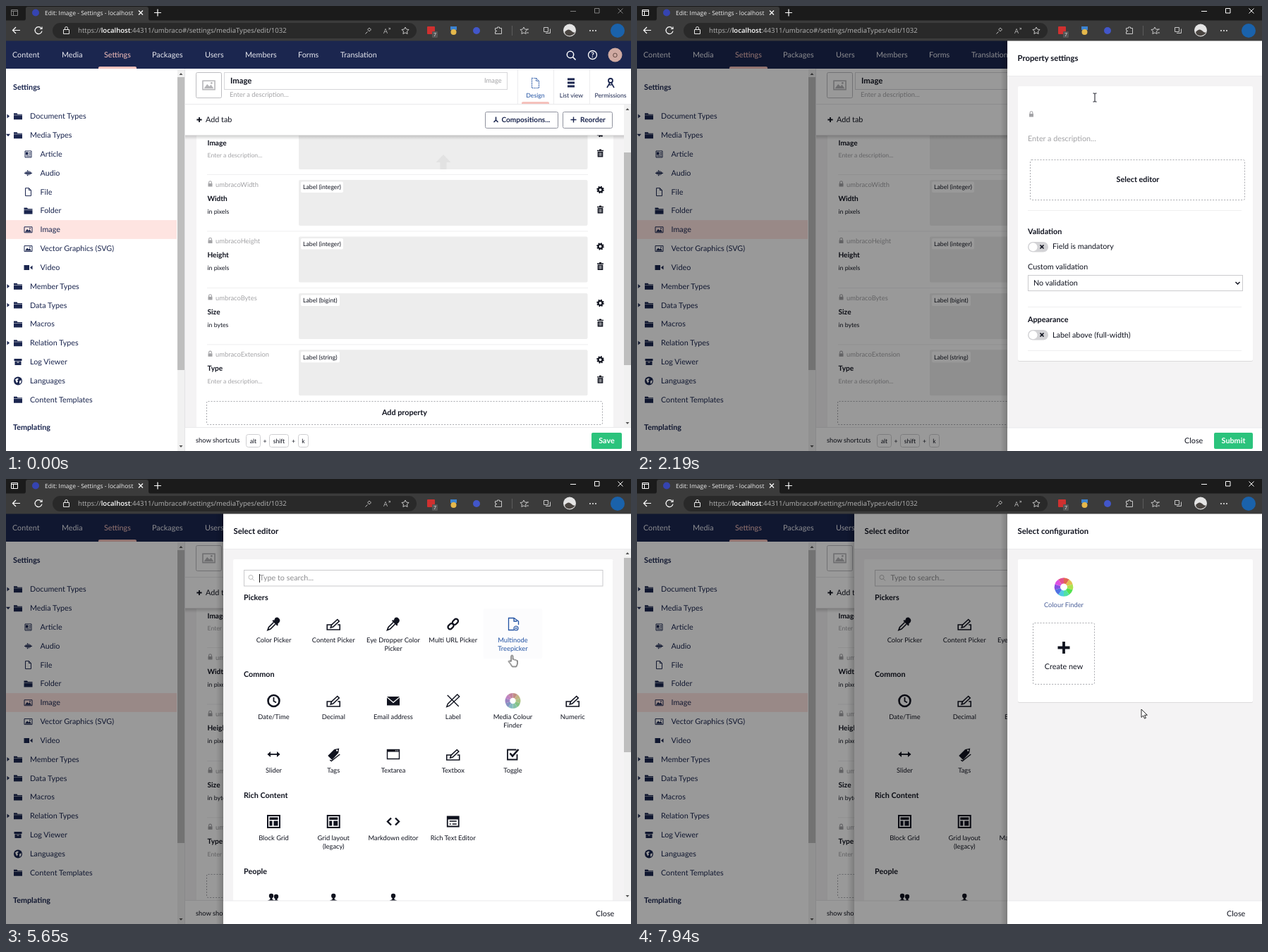
Recreate the animation shown at these times as an HTML page. Size 886 by 632 pixels, loop 8000 ms.

```html
<!DOCTYPE html>
<html lang="en">
<head>
<meta charset="utf-8">
<title>Media type editor</title>
<style>
html, body { margin: 0; width: 100%; height: 100%; overflow: hidden; background: #fff; }
svg { display: block; width: 886px; height: 632px; color: #10131f; }
text { font: 10.8px Lato, sans-serif; fill: currentColor; text-rendering: geometricPrecision; white-space: pre; }
.b { font-weight: 700; }
.h { font-size: 11.3px; font-weight: 700; }
.k { font-size: 10.1px; }
.m { font-size: 9.36px; }
.s { font-size: 8.7px; }
.c { text-anchor: middle; }
.g { fill: #a3a3a6; }
.w { fill: #fff; }
.ui { font-family: "Open Sans", sans-serif; font-size: 8.5px; fill: #f0f0f0; }
.url { font-family: "Open Sans", sans-serif; font-size: 9.58px; fill: #b4b4b4; }
.url tspan { font-weight: 600; fill: #fff; }
.tiny { font-size: 7px; }
.line { fill: none; stroke: currentColor; }
</style>
</head>
<body>
<svg id="stage" viewBox="0 0 886 632" xmlns="http://www.w3.org/2000/svg"></svg>
<script>
const LOOP = 8000, NAVY = '#1b264f', BLUE = '#2152a3', GREEN = '#2bc37c', PAGE = '#f4f3f4', BUTTON_EDGE = '#8f929e';

// Drawing helpers
const text = (x, y, str, cls = '', more = '') => `<text x="${x}" y="${y}" class="${cls}" ${more}>${str}</text>`;
const box = (x, y, w, h, fill, more = '') => `<rect x="${x}" y="${y}" width="${w}" height="${h}" fill="${fill}" ${more}/>`;
const frame = (x, y, w, h, stroke, more = '') => box(x + .5, y + .5, w - 1, h - 1, 'none', `stroke="${stroke}" ${more}`);
const dashed = (x, y, w, h) => frame(x, y, w, h, 'currentColor', 'stroke-opacity=".36" stroke-dasharray="2 2" rx="2"');
const line = (d, width = 1, more = '') => `<path class="line" d="${d}" stroke-width="${width}" ${more}/>`;
const fill = (d, more = '') => `<path d="${d}" fill="currentColor" ${more}/>`;
const dot = (x, y, r, color, more = '') => `<circle cx="${x}" cy="${y}" r="${r}" fill="${color}" ${more}/>`;
const ring = (r, width, more = '') => `<circle class="line" r="${r}" stroke-width="${width}" ${more}/>`;
const group = (id, body) => `<g id="${id}">${body}</g>`;
const tint = (color, body) => `<g color="${color}">${body}</g>`;
const at = (x, y, body, color) => `<g transform="translate(${x} ${y})"${color ? ` color="${color}"` : ''}>${body}</g>`;
const rule = (x1, x2, y, color = '#efeff0') => box(x1, y, x2 - x1, 1, color);

const wheel = (r, hole, sat, light) => {
  const n = 10;
  const point = i => {
    const a = i / n * 2 * Math.PI - Math.PI / 2;
    return `${(r * Math.cos(a)).toFixed(2)} ${(r * Math.sin(a)).toFixed(2)}`;
  };
  let out = '';
  for (let i = 0; i < n; i++)
    out += `<path d="M0 0L${point(i)}A${r} ${r} 0 0 1 ${point(i + 1)}Z" fill="hsl(${(10 + i * 36) % 360} ${sat}% ${light}%)"/>`;
  return out + dot(0, 0, hole, '#fff');
};

const person = dot(0, -3, 3.2, 'currentColor') + fill('M-1.5-1h3v3l4 2v4h-11v-4l4-2z');
const chainLink = x => `<rect class="line" x="${x}" y="-3" width="9" height="6" rx="3" stroke-width="2.3"/>`;
const icons = {
  folder: fill('M-6-4.5h4.5l1 1.5H6v1h-12zM-6-1.5H6v6h-12z'),
  article: line('M-4.5-4.5h9v9h-9zM1-2h2.5M1 0h2.5M-3 2.5h6.5') + fill('M-3.5-3h3.5v4h-3.5z'),
  audio: line('M-5.5 0h11M-3-2v4M-1-4v8M1-3v6M3-2v4', 1.3),
  file: line('M-4-5.5h5l3 3v8h-8zM1-5.5v3h3'),
  image: line('M-5.5-4h11v8h-11z') + fill('M-4.5 3l3-4 2 2.2L2-.5 4.5 3z') + dot(2.5, -2, .9, 'currentColor'),
  video: fill('M-6-3.5h7.5v7H-6zM2.5 0L6-3v6z'),
  box: fill('M-5.5-4.5h11v3h-11zM-4.5-1h9v5.5h-9z') + box(-1.5, 0, 3, 1, '#fff'),
  globe: dot(0, 0, 6, 'currentColor') + '<path d="M-4-2l3-2 2 1-2 2 1 2-2 2zM2 0l3-1-1 4-2 1z" fill="#fff"/>',
  lock: tint('#a3a3a6', fill('M-3-1h6v4.5h-6z') + line('M-1.9-1v-1.3a1.9 1.9 0 0 1 3.8 0V-1', 1.1)),
  gear: ring(3, 2.3) + ring(4.4, 1.8, 'stroke-dasharray="1.8 1.656"'),
  trash: fill('M-4.5-4.2h3v-1.3h3v1.3h3v1.4h-9zM-3.8-2h7.6v7.5h-7.6z') + '<path d="M-1.6-.8v5M0-.8v5M1.6-.8v5" stroke="#fff" stroke-width=".7"/>',
  dropper: fill('M2-8.5q3-2 5.5.5t.5 5.5L5.5 0l1 1L5 2.5l-7-7L-.5-6l1 1z') + line('M0-2.5l-7 7-1.5 4 4-1.5 7-7', 1.7),
  edit: line('M-2 1h-7v7H9V1H6', 1.6) + line('M-4 5l1-3.5L5.5-6.5 8-4-.5 4z', 1.6),
  link: `<g transform="rotate(-45)">${chainLink(-9)}${chainLink(0)}</g>`,
  docplus: line('M2 8.5h-8v-17h7.5L8-4V1M1.5-8.5V-4H6', 1.3) + ring(3, 1.2, 'cx="4.5" cy="6"') + line('M4.5 4.5v3M3 6h3'),
  clock: ring(8, 2.6) + line('M0-5V.5l3.5 2', 1.8),
  mail: fill('M-9-6H9L0 1.5zM-9-4.5L0 3.2 9-4.5v11H-9z'),
  label: line('M-8-8L8 8M-9 8.5L-7.5 4.5 6-9l3 3L-5 7z', 1.4),
  slider: line('M-8 0H8', 1.8) + fill('M-9 0l4.5-4v8zM9 0L4.5-4v8z'),
  tags: fill('M-8 2L1-7l7-1.5L7-2-2 8z') + line('M-5 8l2 1.5L9 0', 1.5) + dot(5, -5.5, 1.2, '#fff'),
  window: line('M-8.5-6.5h17v13h-17z', 1.4) + fill('M-9-7H9v3.5H-9z') + '<path d="M3-5.2h4.5" stroke="#fff" stroke-dasharray="1 .7"/>',
  check: line('M5-6.5H-7.5v14H6V0', 1.8) + line('M-4-1.5l3.5 4L8-7', 2.6),
  grid: line('M-8.5-8.5h17v17h-17z', 2) + fill('M-6-6H6v3.5H-6zM-6-1h4v7h-4zM0-1h6v7H0z'),
  code: line('M-3-5l-5 5 5 5M3-5l5 5-5 5', 2.4),
  rich: line('M-8-7H8V7H-8z', 1.8) + fill('M-8-7H8v4H-8z') + line('M-5-.5H5M-5 3.5h2M-1 3.5h6', 1.7),
  person,
  people: at(3.5, 1, person) + at(-3.5, 0, person),
  wheel: wheel(11, 4.2, 34, 64)
};
const icon = (name, x, y, color) => at(x, y, icons[name], color);
const plus = (x, y, r, w) => line(`M${x - r} ${y}h${2 * r}M${x} ${y - r}v${2 * r}`, w);

const scrollbar = (x, top, bottom, thumbTop, thumbBottom) =>
  box(x, top, 10, bottom - top, '#f1f1f1') + box(x, thumbTop, 10, thumbBottom - thumbTop, '#bebebe') +
  `<path d="M${x + 2.5} ${top + 8}l2.5-3 2.5 3zM${x + 2.5} ${bottom - 8}l2.5 3 2.5-3z" fill="#555"/>`;

const button = (x, w, label) => box(x, 606, w, 23, GREEN, 'rx="2"') + text(x + w / 2, 620.5, label, 'b c w');

function browser() {
  const windowButtons = line('M800 7.5h8M834.5 3.5h6.5v6.5h-6.5zM867.5 3.5l7 7M874.5 3.5l-7 7M7.5 5.5h9v8h-9zM7.5 7.5h9M10.5 7.5v6', 1, 'color="#fff"');
  const tools = line('M20 34.5H9.5M14 30l-4.5 4.5L14 39M50 31.5a5 5 0 1 0 1 4M51 29.5v3h-3M188 6.5l6 6M194 6.5l-6 6M210 9.5h10M215 4.5v10', 1.2, 'color="#fff"');
  const lock = line('M81.5 33.5h8v6h-8zM83.5 33.5v-2a2 2 0 0 1 4 0v2', 1, 'color="#e8e8e8"');
  const star = 'l1.5 3 3.5.5-2.5 2.5.6 3.5-3.1-1.6-3.1 1.6.6-3.5-2.5-2.5 3.5-.5z';
  const actions = line(`M566 30${star}M734 30${star}M738 33h3M738 38h3M512.5 36.5l-3 3M515 31.5a2 2 0 1 0 .1 0M762.5 30.5h6v6h-6zM765 38.5h6.5v-6M693.5 31.5h3v-1.5h3v1.5h3v8h-9v-3h1.5v-2h-1.5z`, 1, 'color="#c8c8c8"');
  return box(0, 0, 886, 22, '#1b1b1b') + box(0, 20.5, 886, 29, '#3b3b3b') +
    '<path d="M25 21q3 0 3-4V4q0-3 3-3h168q3 0 3 3v13q0 4 3 4z" fill="#3b3b3b"/>' +
    group('chrome', windowButtons) + dot(42, 9.5, 5, '#3544b1') +
    text(55, 12.5, 'Edit: Image - Settings - localhost', 'ui') +
    box(66, 24, 516, 22, '#292929', 'rx="11"') + tools + lock +
    text(102, 38, 'https://<tspan>localhost</tspan>:44311/umbraco#/settings/mediaTypes/edit/1032', 'url') +
    actions + text(535, 38.5, 'A', 'url') + text(542, 34, '»', 'ui tiny') +
    box(597, 29, 11, 11, '#d0302f', 'rx="1"') + box(604, 36, 8, 9, '#555', 'rx="1"') + text(606, 43, '7', 'ui tiny') +
    box(630, 29, 9, 5, '#3b82d0') + dot(634.5, 37, 4, '#e5b84b') + dot(667, 35, 5, '#4256c9') +
    box(717, 28, 1, 14, '#5b5b5b') + dot(799, 34.5, 9, '#e4e4e4') + '<path d="M792 37q5-6 9-2t6 2a9 9 0 0 1-14 3z" fill="#4a4541"/>' +
    [828, 832, 836].map(x => dot(x, 35, 1, '#eee')).join('') + dot(867, 35, 10, '#1a62ab');
}

function navigation() {
  const items = [['Content', 9], ['Media', 79], ['Settings', 139], ['Packages', 207], ['Users', 282], ['Members', 339], ['Forms', 414], ['Translation', 474]];
  return box(0, 49, 886, 40, NAVY) +
    items.map(([name, x]) => text(x, 72.7, name, '', `style="fill:${name === 'Settings' ? '#f5c1bc' : '#e6e7ee'}"`)).join('') +
    '<path d="M131 89v-1.5q0-1.5 2-1.5h50q2 0 2 1.5V89z" fill="#f5c1bc"/>' +
    at(800, 69, ring(4.7, 1.5) + line('M3.5 3.5l4 4', 1.7), '#fff') +
    at(831.5, 69.5, ring(6, 1.3) + text(0, 3.5, '?', 'b k c'), '#fff') +
    dot(863.5, 69.5, 10, '#d0aaa2') + text(863.5, 72.7, 'O', 's c', 'style="fill:#4d3630"');
}

function sidebar() {
  const rows = [
    ['Document Types', 'folder', 0, 'closed'], ['Media Types', 'folder', 0, 'open'], ['Article', 'article', 1], ['Audio', 'audio', 1],
    ['File', 'file', 1], ['Folder', 'folder', 1], ['Image', 'image', 1], ['Vector Graphics (SVG)', 'image', 1], ['Video', 'video', 1],
    ['Member Types', 'folder', 0, 'closed'], ['Data Types', 'folder', 0, 'closed'], ['Macros', 'folder', 0],
    ['Relation Types', 'folder', 0, 'closed'], ['Log Viewer', 'box', 0], ['Languages', 'globe', 0], ['Content Templates', 'folder', 0]
  ];
  const arrows = { closed: 'M1.5-3l3.5 3-3.5 3z', open: 'M0-1.5h6l-3 3.5z' };
  const body = rows.map(([name, glyph, level, arrow], i) => {
    const y = 156.5 + i * 26.83;
    return (name === 'Image' ? box(0, y - 13.4, 242, 26.8, '#fee4e1') : '') +
      (arrow ? at(0, y, fill(arrows[arrow])) : '') +
      icon(glyph, level ? 31.5 : 17, y + .3) + text(level ? 48.5 : 34, y + 3.7, name);
  }).join('');
  return box(0, 89, 243, 543, '#fff') +
    tint(NAVY, text(10, 119, 'Settings', 'b') + body + text(10, 601.7, 'Templating', 'b')) +
    scrollbar(243, 90, 632, 101, 517) + box(253, 89, 1, 543, '#e4e4e6');
}

function property(y, alias, name, note, type) {
  const tagWidth = type === 'integer' ? 60 : 55;
  return rule(285, 825, y - 8) + icon('lock', 289.5, y + 6) + text(297, y + 10, alias, 'm g') + text(285.5, y + 30, name, 'b k') +
    text(285.5, y + 48, note, note.startsWith('E') ? 's g' : 's') +
    box(415, y, 409.5, 65, '#ededed', 'rx="2"') + box(418, y + 2.5, tagWidth, 15.5, '#fff', 'rx="2"') +
    text(421, y + 13.3, `Label (${type})`, 's') + icon('gear', 842.5, y + 14) + icon('trash', 842.5, y + 42);
}

function workspace() {
  const describe = 'Enter a description...';
  const props = [['umbracoWidth', 'Width', 'in pixels', 'integer'], ['umbracoHeight', 'Height', 'in pixels', 'integer'],
    ['umbracoBytes', 'Size', 'in bytes', 'bigint'], ['umbracoExtension', 'Type', describe, 'string']];
  const list = box(270, 184, 591, 415, '#fff') + text(285.5, 197.5, 'Image', 'b k') + text(285.5, 214.5, describe, 's g') +
    box(415, 180, 409.5, 52, '#ededed', 'rx="2"') + '<path d="M620 211l10.5 11h-6v10h-9v-10h-6z" fill="#e2e2e2"/>' +
    icon('gear', 842.5, 181) + icon('trash', 842.5, 209) +
    props.map((p, i) => property(247 + i * 80.45, ...p)).join('') +
    group('addProperty', dashed(284, 561, 562, 34) + text(565, 581, 'Add property', 'b c'));
  const header = box(254, 89, 632, 51, '#fff') + frame(269, 94, 37, 37, '#bdbdc1', 'rx="2"') +
    at(287.5, 112.5, `<g transform="scale(1.55)">${icons.image}</g>`, '#b5b5b8') +
    frame(309, 94, 402, 25, '#d6d6d9') + text(318, 109.5, 'Image', 'h') + text(678, 108.5, 'Image', 'm g') + text(317, 129, describe, 'm g') +
    [725, 776, 827].map(x => box(x, 89, 1, 51, '#ececee')).join('') + rule(254, 886, 139, '#e9e9eb') +
    tint(BLUE, line('M745.5 102.5h6l4 4v10h-10zM751.5 102.5v4h4', 1.2, 'stroke-dasharray="1.5 1"') + text(750.5, 129.7, 'Design', 's c')) +
    '<path d="M731 139v-1.5q0-1.5 2-1.5h35q2 0 2 1.5V139z" fill="#f5c1bc"/>' +
    tint(NAVY, line('M796 104h10M796 109h10M796 114h10', 2.8) + text(801.5, 129.7, 'List view', 's c') +
      at(857, 106, ring(3, 1.8) + line('M-1 3l-4 7M1 3l4 7M-2.5 6h4', 1.6)) + text(857, 129.7, 'Permissions', 's c'));
  const tabs = box(254, 183, 622, 7, 'url(#below)') + box(254, 140, 622, 43.5, '#fff') + plus(274, 161.5, 3.6, 1.8) + text(283, 164.5, 'Add tab') +
    tint(NAVY, frame(679, 150, 104, 24, BUTTON_EDGE, 'rx="2"') + line('M694.5 157.5v4.5l-3 3M694.5 162l3 3', 1.6) + text(702.5, 164.7, 'Compositions...', 'b k') +
      frame(789, 150, 71, 24, BUTTON_EDGE, 'rx="2"') + plus(804.5, 161.5, 4, 1.4) + text(814, 164.7, 'Reorder', 'b k'));
  const key = (x, w, label) => frame(x, 608, w, 19, '#cfcfd2', 'rx="3"') + text(x + w / 2, 620.5, label, 's c');
  return box(254, 89, 632, 543, PAGE) + list + tabs + header + scrollbar(876, 140, 599, 208, 510) +
    box(254, 599, 632, 33, '#fff') + rule(254, 886, 598, '#e9e9eb') + text(269, 620, 'show shortcuts', 'm') +
    key(340, 21, 'alt') + text(367, 620.5, '+', 's c') + key(373, 28, 'shift') + text(407.5, 620.5, '+', 's c') + key(414, 15, 'k') + button(830, 43, 'Save');
}

// A sliding panel: bare sheet first, contents fade in on top, then the shade
function panel(id, x, title, body, foot) {
  const w = 886 - x;
  return group(id, box(x - 10, 49, 10, 583, 'url(#beside)') + box(x, 49, w, 583, PAGE) +
    group(id + 'Body', body + box(x, 49, w, 50, '#fff') + rule(x, 886, 99, '#ebebed') + text(x + 14.5, 77.5, title, 'h') +
      box(x, 599, w, 33, '#fff') + rule(x, 886, 598.5, '#e9e9eb') + foot) +
    box(x, 49, w, 583, '#000', `id="${id}Shade" opacity="0"`));
}
const card = (x, w, h) => box(x, 115, w, h, '#000', 'opacity=".1" rx="2"') + box(x, 114, w, h, '#fff', 'rx="2"');

function settingsPanel() {
  const toggle = y => box(554, y - 7, 29, 14.5, '#d3d3d6', 'rx="7.2"') + dot(561.5, y + .2, 6, '#fff') + line(`M571.5 ${y - 2.5}l5 5m0-5l-5 5`, 1.7);
  const letters = [...'Colours'].map(c => `<tspan>${c}</tspan>`).join('');
  const body = card(540, 333, 390) + text(554, 141.5, letters, 'h', 'id="typed"') + box(554, 132, 1, 12, '#111', 'id="caret"') +
    `<path id="squiggle" d="M554 144.5${'l1.5-1.5 1.5 1.5'.repeat(13)}" fill="none" stroke="#c33" stroke-width=".8"/>` +
    icon('lock', 559, 154) + text(566, 158, 'Generating alias...', 'm g', 'id="generating"') + text(566, 158, 'colours', 'm g', 'id="alias"') +
    text(554, 192, 'Enter a description...', 'g') + group('selectEditor', dashed(557, 218, 305, 58) + text(710, 250, 'Select editor', 'b c')) +
    rule(554, 857, 290) + text(554, 323.5, 'Validation', 'b') + toggle(342) + text(589, 345, 'Field is mandatory') +
    text(554, 374, 'Custom validation') + frame(554, 382, 305, 23, '#cbcbce') + text(562, 397, 'No validation') + line('M848.5 392l3 3 3-3', 1.5) +
    rule(554, 857, 427) + text(554, 448.5, 'Appearance', 'b') + toggle(467) + text(589, 470.5, 'Label above (full-width)') + rule(554, 857, 489);
  return panel('settings', 525, 'Property settings', body, text(776, 620.5, 'Close') + button(818, 55, 'Submit'));
}

function editorPanel() {
  const rows = [
    [206, 'Color Picker:dropper', 'Content Picker:edit', 'Eye Dropper Color|Picker:dropper', 'Multi URL Picker:link', 'Multinode|Treepicker:docplus:tree'],
    [315, 'Date/Time:clock', 'Decimal:edit', 'Email address:mail', 'Label:label', 'Media Colour|Finder:wheel:finder', 'Numeric:edit'],
    [391, 'Slider:slider', 'Tags:tags', 'Textarea:window', 'Textbox:edit', 'Toggle:check'],
    [486.5, 'Block Grid:grid', 'Grid layout|(legacy):grid', 'Markdown editor:code', 'Rich Text Editor:rich'],
    [595, ':people', ':person', ':person']
  ];
  const cell = (spec, x, y) => {
    const [label, glyph, id] = spec.split(':');
    const content = icon(glyph, x, y) + label.split('|').map((s, i) => text(x, y + 26 + i * 12.2, s, 'm c')).join('');
    return id ? box(x - 42, y - 22, 84, 71, '#f8f8f9', `id="${id}Back" rx="2"`) + group(id, content) : content;
  };
  const body = card(322, 538.5, 500) + frame(337, 129, 509.5, 23.5, '#c9c9cc') +
    at(347, 139.5, ring(3, 1) + line('M2 2l3 3'), '#bbb') + text(359.5, 144, 'Type to search...', '', 'style="fill:#8d8d90"') + box(359, 135, 1, 12, '#111', 'id="searchCaret"') +
    [['Pickers', 172], ['Common', 280.5], ['Rich Content', 452.5], ['People', 561]].map(([s, y]) => text(337, y, s, 'b')).join('') +
    rows.map(([y, ...cells]) => cells.map((c, i) => cell(c, 379.5 + i * 84.75, y)).join('')).join('') +
    scrollbar(876, 99, 599, 112, 388);
  return panel('editors', 308, 'Select editor', body, text(836, 620.5, 'Close'));
}

function configPanel() {
  const body = card(540, 333, 203) + at(605, 153.5, wheel(13.3, 5, 72, 60)) + text(605, 182, 'Colour Finder', 'm c', 'style="fill:#4a5f99"') +
    dashed(561, 204, 88, 88) + plus(605, 239.5, 8.5, 3.8) + text(605, 270, 'Create new', 'c');
  return panel('config', 525, 'Select configuration', body, text(836, 620.5, 'Close'));
}

const cursor = group('cursor',
  '<g fill="#fff" stroke="#111" stroke-width=".9" stroke-linejoin="round">' +
  '<path id="arrow" d="M0 0V11.5l2.7-2.5 1.8 4.2 1.9-.8-1.8-4.1h3.7z"/>' +
  '<path id="hand" d="M-1.4 8.5V1.2a1.2 1.2 0 0 1 2.5 0V5.8l1.5-.2 1 .9 1.5-.2.9 1 1.5.2V12l-1.5 4H0l-2.4-4-2.8-3.4q.7-1.4 2-.6z"/></g>' +
  line('M-2.5-6H-.8L0-5.3.8-6h1.7M0-5.5v11M-2.5 6H-.8L0 5.3.8 6h1.7', 1, 'id="beam"'));

const gradient = (id, dir, from, to) => `<linearGradient id="${id}" ${dir}><stop offset="0" stop-opacity="${from}"/><stop offset="1" stop-opacity="${to}"/></linearGradient>`;
const $ = id => document.getElementById(id);
$('stage').innerHTML = '<defs>' + gradient('below', 'x2="0" y2="1"', .2, 0) + gradient('beside', '', 0, .18) + '</defs>' +
  workspace() + sidebar() + navigation() + box(0, 49, 886, 583, '#000', 'id="baseShade"') +
  settingsPanel() + editorPanel() + configPanel() + browser() + cursor;

// Each step is [time, value, easing towards the next step]
function play(el, prop, steps, easing = 'step-end') {
  const full = [[0, steps[0][1]], ...steps, [LOOP, steps.at(-1)[1]]];
  el.animate(full.map(([t, value, ease = easing]) => ({ offset: t / LOOP, [prop]: value, easing: ease })), { duration: LOOP, iterations: Infinity });
}
const shift = (x, y = 0) => `translate(${x}px, ${y}px)`;
const fade = (id, from, to, end = 1) => play($(id), 'opacity', [[from, 0], [to, end]], 'linear');
const show = (id, ...times) => play($(id), 'opacity', [[0, 0], ...times.map((t, i) => [t, 1 - i % 2])]);
const hover = (id, from, to) => play($(id), 'color', [[0, '#10131f'], [from, BLUE], [to, '#10131f']]);
const slide = (id, width, start) =>
  play($(id), 'transform', [[0, shift(width + 40)], [start, shift(width), 'ease-in-out'], [start + 400, shift(0)]]);

slide('settings', 361, 1173);
slide('editors', 578, 5136);
slide('config', 361, 7182);
fade('settingsBody', 1480, 1680);
fade('editorsBody', 5440, 5630);
fade('configBody', 7490, 7690);
fade('baseShade', 1190, 1380, .4);
fade('settingsShade', 5180, 5340, .4);
fade('editorsShade', 7310, 7530, .4);
play($('chrome'), 'opacity', [[0, .45], [1060, 1]]);

// Typing
const typed = $('typed'), typedAt = [2720, 2850, 3180, 3290, 3400, 3510, 3910];
[...typed.children].forEach((letter, i) => play(letter, 'fillOpacity', [[0, 0], [typedAt[i], 1]]));
play($('caret'), 'transform', [[0, shift(0)], ...typedAt.map((t, i) => [t, shift(typed.getSubStringLength(0, i + 1))])]);
show('caret', 1690, 2190, 2720, 4420);
show('generating', 2720, 4290);
show('alias', 4290);
show('squiggle', 4970);
show('searchCaret', 5500, 5990, 6460, 7060);

hover('addProperty', 800, 1190);
hover('selectEditor', 4550, 4970);
hover('tree', 5600, 6160);
hover('finder', 6300, 7180);
play($('treeBack'), 'opacity', [[5610, 0], [5740, 1], [6130, 1], [6240, 0]], 'linear');
play($('finderBack'), 'opacity', [[6290, 0], [6400, 1]], 'linear');

// Pointer
play($('cursor'), 'transform', [
  [0, shift(640, 660)], [370, shift(622, 628), 'ease-out'], [960, shift(579, 577)],
  [1500, shift(579, 577), 'ease-in-out'], [1980, shift(649, 130)],
  [4290, shift(649, 130), 'ease-in-out'], [4720, shift(723, 251)],
  [5420, shift(723, 251), 'ease-out'], [5640, shift(717.5, 250.5)],
  [5990, shift(717.5, 250.5), 'ease-in-out'], [6460, shift(726, 334)],
  [7480, shift(726, 334), 'ease-in-out'], [7900, shift(715, 327)]
]);
play($('arrow'), 'opacity', [[0, 1], [800, 0], [1190, 1], [1930, 0], [4350, 1], [4550, 0], [5180, 1], [5580, 0], [7190, 1]]);
show('hand', 800, 1190, 4550, 5180, 5580, 7190);
show('beam', 1930, 4350);
</script>
</body>
</html>
```
